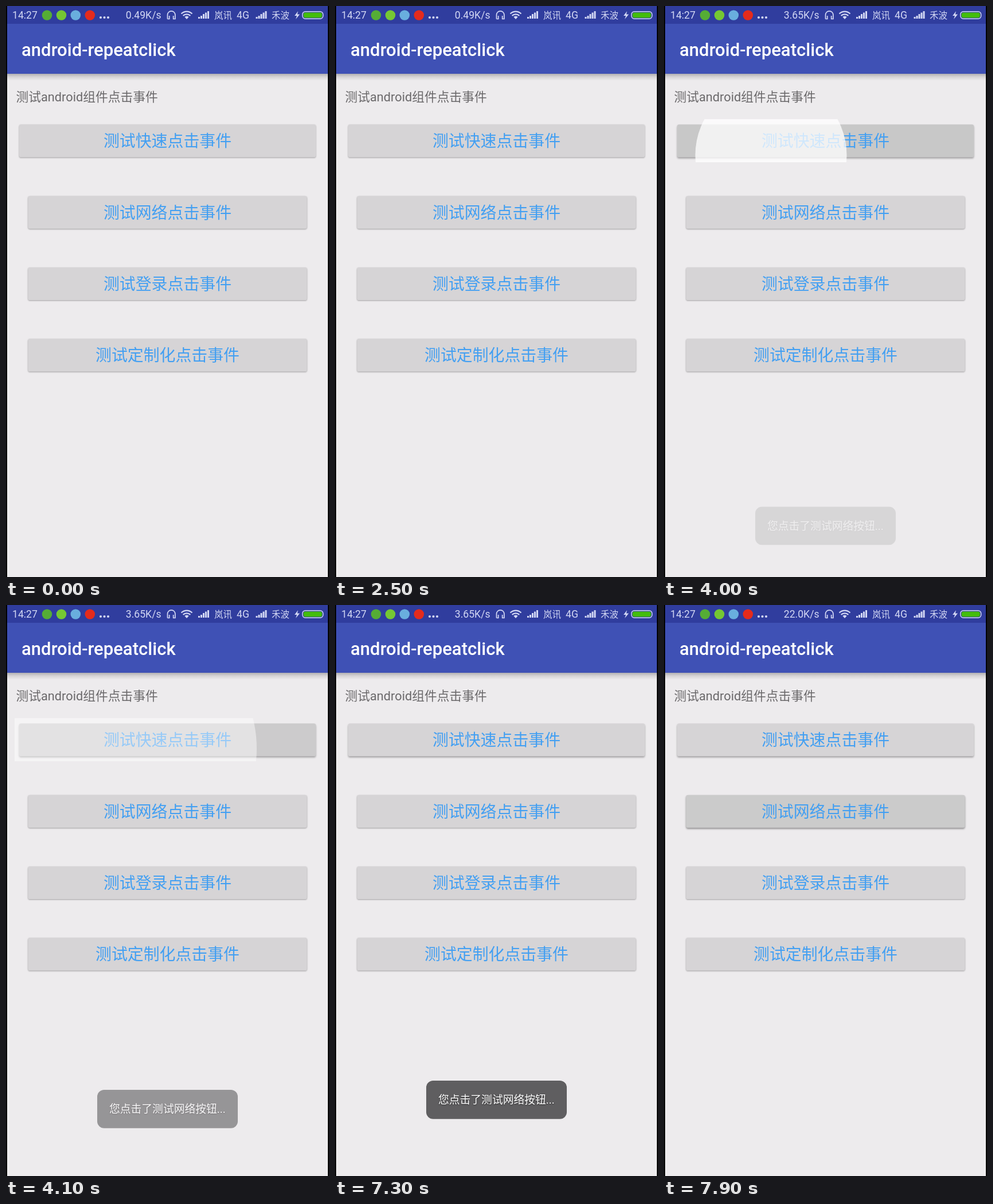
Animation, 563 px wide and 994 px high, one loop 8000 ms. Source, as an HTML page:

```html
<!DOCTYPE html>
<html lang="zh-CN">
<head>
<meta charset="utf-8">
<title>android-repeatclick</title>
<style>
  html, body { margin: 0; width: 100%; height: 100%; overflow: hidden; background: #000; }
  svg { display: block; width: 100%; height: 100%; }
  text { font-family: Roboto, "Noto Sans CJK SC", "Noto Sans CJK", sans-serif; }

  .title { font-size: 31.07px; font-weight: 500; fill: #fff; }
  .hint { font-size: 21.75px; fill: #6b696b; }
  .label { font-size: 27.9px; fill: #429ff2; text-anchor: middle; }
  .status { font-size: 17.6px; fill: #d3d8f4; }
  .carrier { font-size: 15.5px; }
  .speed { text-anchor: end; }
  .button { fill: #d6d4d6; filter: drop-shadow(0 1.4px .8px #0005); }
  .toast text { font-size: 18.8px; fill: #fff; filter: drop-shadow(0 1px 1px #0008); }

  /* The screen refreshes ten times a second, so every change is a hard step. */
  .anim { animation: 8s step-end infinite; }
  .speed-a { animation-name: speed-a; }
  .speed-b { animation-name: speed-b; }
  .speed-c { animation-name: speed-c; }
  .press-1 { animation-name: press-1; }
  .press-2 { animation-name: press-2; }
  .ripple { animation-name: ripple; }
  .toast { animation-name: toast; }

  @keyframes speed-a {
    0% { opacity: 1; }
    46.25%, 100% { opacity: 0; }
  }
  @keyframes speed-b {
    0% { opacity: 0; }
    46.25% { opacity: 1; }
    96.25%, 100% { opacity: 0; }
  }
  @keyframes speed-c {
    0% { opacity: 0; }
    96.25%, 100% { opacity: 1; }
  }
  @keyframes press-1 {
    0% { fill: #d6d4d6; }
    47.5% { fill: #cbcbcb; filter: drop-shadow(0 2px 1.5px #0005); }
    48.75% { fill: #c8c8c8; filter: drop-shadow(0 2px 1.5px #0005); }
    51.25% { fill: #cccbcc; }
    52.5% { fill: #d2d1d2; }
    53.75%, 100% { fill: #d6d4d6; }
  }
  @keyframes press-2 {
    0% { fill: #d6d4d6; }
    98.75%, 100% { fill: #cbcbcb; filter: drop-shadow(0 2px 1.7px #0006); }
  }
  @keyframes ripple {
    0% { opacity: 0; r: 0; cx: 165px; cy: 266px; }
    48.75% { opacity: .75; r: 62px; cx: 172px; cy: 264px; }
    50% { opacity: .75; r: 132px; cx: 186.5px; cy: 260px; }
    51.25% { opacity: .45; r: 215px; cx: 222px; cy: 250px; }
    52.5% { opacity: .15; r: 270px; cx: 260px; cy: 240px; }
    53.75%, 100% { opacity: 0; r: 0; cx: 165px; cy: 266px; }
  }
  @keyframes toast {
    0% { opacity: 0; transform: none; }
    50% { opacity: .146; transform: translateY(43.5px); }
    51.25% { opacity: .6; transform: translateY(16px); }
    52.5% { opacity: .92; transform: translateY(4px); }
    53.75% { opacity: 1; transform: none; }
    91.25% { opacity: .985; transform: none; }
    92.5% { opacity: .5; transform: none; }
    93.75%, 100% { opacity: 0; transform: none; }
  }
</style>
</head>
<body>
<svg viewBox="0 0 563 994" preserveAspectRatio="none">
  <defs>
    <linearGradient id="shade" x2="0" y2="1">
      <stop stop-color="#000" stop-opacity=".25"/>
      <stop offset=".45" stop-color="#000" stop-opacity=".1"/>
      <stop offset="1" stop-color="#000" stop-opacity="0"/>
    </linearGradient>
    <clipPath id="touch-area"><path d="M15 197H548V271.5H15z"/></clipPath>
    <path id="signal" d="M0 22v-3h3v3zM4 22v-5h3v5zM8 22v-8h3v8zM12 22v-10.5h3v10.5zM16 22v-13h3v13z"/>
  </defs>

  <rect width="563" height="994"/>
  <rect x="2" width="559" height="994" fill="#edebed"/>
  <rect x="2" y="118" width="559" height="12" fill="url(#shade)"/>
  <rect x="2" y="30" width="559" height="88" fill="#3f51b5"/>
  <rect x="2" width="559" height="31" fill="#303d9e"/>

  <!-- Status bar -->
  <g class="status">
    <text x="11" y="22.3">14:27</text>
    <circle cx="71.5" cy="16" r="8.8" fill="#55ad35"/>
    <circle cx="96.5" cy="16" r="8.8" fill="#75c733"/>
    <circle cx="121.3" cy="16" r="8.8" fill="#69aede"/>
    <circle cx="146.3" cy="16" r="8.8" fill="#e52b1c"/>
    <circle cx="165" cy="20" r="2.1"/>
    <circle cx="171.5" cy="20" r="2.1"/>
    <circle cx="178" cy="20" r="2.1"/>
    <text class="speed anim speed-a" x="270.5" y="22.3">0.49K/s</text>
    <text class="speed anim speed-b" x="270.5" y="22.3" opacity="0">3.65K/s</text>
    <text class="speed anim speed-c" x="270.5" y="22.3" opacity="0">22.0K/s</text>
    <g fill="none" stroke="#d3d8f4" stroke-width="1.7">
      <path d="M281.5 22.5V15.5a6.7 6.7 0 0 1 13.4 0V22.5h-3.2V17M281.5 22.5h3.2V17"/>
      <path stroke-width="2.2" d="M305.5 13.5a13.5 13.5 0 0 1 19 0M308.7 16.9a9 9 0 0 1 12.6 0"/>
    </g>
    <path d="M311.3 19a5.3 5.3 0 0 1 7.4 0L315 23z"/>
    <use href="#signal" x="335"/>
    <text class="carrier" x="363" y="21.7">岚讯</text>
    <text x="402" y="22.3">4G</text>
    <use href="#signal" x="435.5"/>
    <text class="carrier" x="463" y="21.7">禾波</text>
    <path d="M509 9l-6 8h4l-2 6 7-8.5h-4.2z"/>
    <rect x="516.7" y="9.7" width="36" height="12.6" rx="5" fill="none" stroke="#d3d8f4" stroke-width="1.4"/>
    <rect x="518.5" y="11.5" width="32.4" height="9" rx="3.4" fill="#43bd0c"/>
  </g>

  <text class="title" x="27" y="86.7">android-repeatclick</text>
  <text class="hint" x="17.5" y="166">测试android组件点击事件</text>

  <!-- Buttons -->
  <rect class="button anim press-1" x="23" y="206.3" width="517" height="57" rx="3.1"/>
  <text class="label" x="281.5" y="245.3">测试快速点击事件</text>
  <g clip-path="url(#touch-area)">
    <circle class="anim ripple" fill="#fff" opacity="0"/>
  </g>
  <rect class="button anim press-2" x="38.5" y="330.7" width="486" height="57" rx="3.1"/>
  <text class="label" x="281.5" y="369.6">测试网络点击事件</text>
  <rect class="button" x="38.5" y="455" width="486" height="57" rx="3.1"/>
  <text class="label" x="281.5" y="493.9">测试登录点击事件</text>
  <rect class="button" x="38.5" y="579.3" width="486" height="57" rx="3.1"/>
  <text class="label" x="281.5" y="618.2">测试定制化点击事件</text>

  <g class="toast anim" opacity="0">
    <rect x="159" y="828" width="245" height="66.7" rx="12" fill="#5d5c5e"/>
    <text x="180" y="868.4">您点击了测试网络按钮...</text>
  </g>
</svg>
</body>
</html>
```
